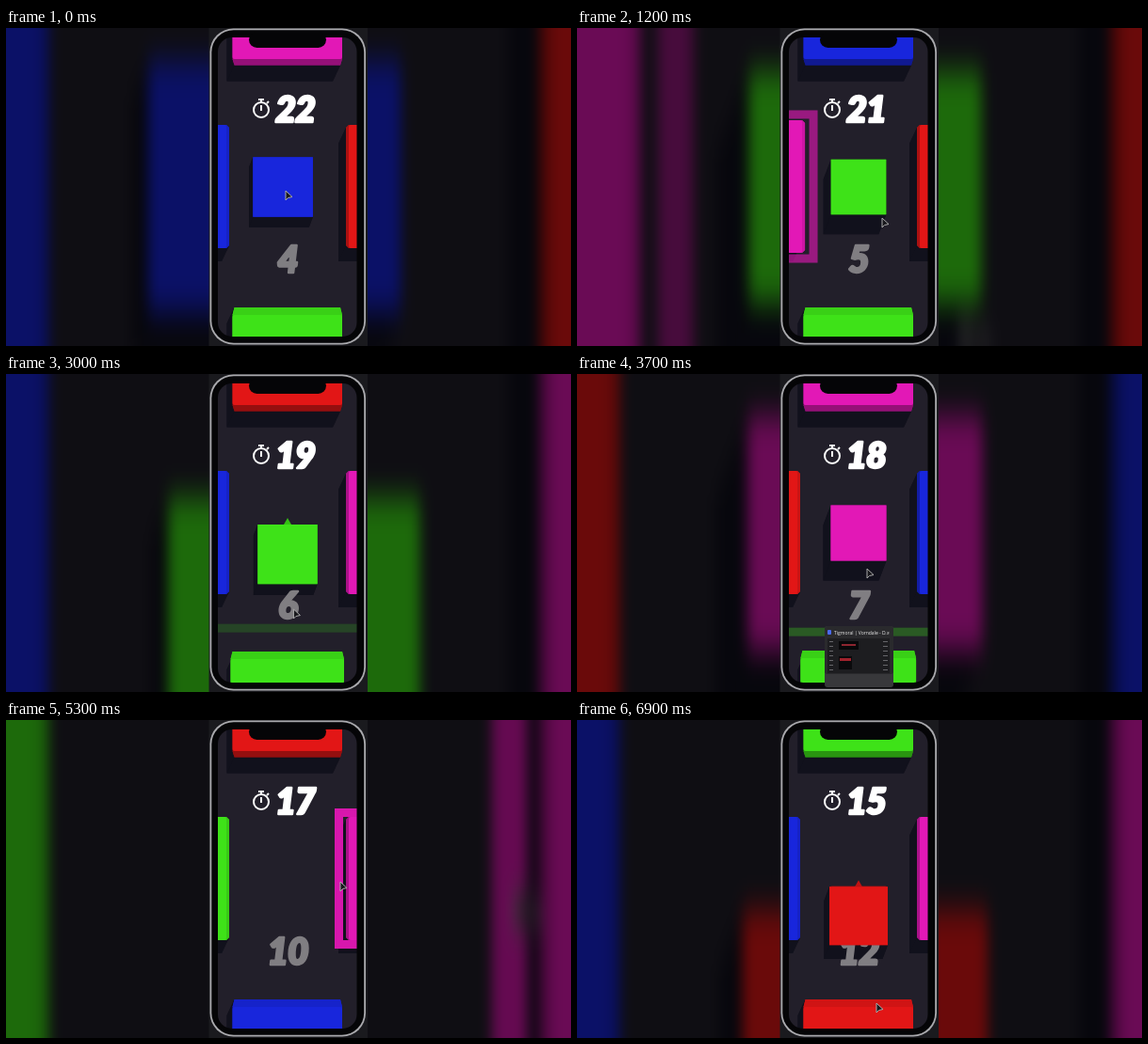
An HTML page with a canvas that plays this animation: 600 by 338 pixels, repeating every 7000 ms.

```html
<!DOCTYPE html>
<html lang="en">
<head>
<meta charset="utf-8">
<title>Swipe the cube</title>
<style>
  html, body { margin: 0; width: 100%; height: 100%; overflow: hidden; background: #0e0c12; }
  canvas { display: block; width: 600px; height: 338px; }
</style>
</head>
<body>
<canvas id="stage" width="600" height="338"></canvas>
<script>
const LOOP = 7000, STEP = 100, W = 600, H = 338;
const CX = 299, CY = 169;
const SHADOW = '#11111c';
const COLORS = { m: [226, 24, 182], b: [24, 38, 220], r: [226, 22, 22], g: [62, 226, 24] };

// Sides in order: top, left, right, bottom. Rectangles are [x0, y0, x1, y1].
const SIDES = [
  { dx: 0, dy: -1, travel: 130, shade: .66, front: [240.5, -15, 357, 33], base: [242.5, -15, 355, 39.5] },
  { dx: -1, dy: 0, travel: 70, shade: .9, front: [200, 103, 234, 234], base: [200, 106, 237, 231] },
  { dx: 1, dy: 0, travel: 70, shade: .75, front: [364, 103, 398, 234], base: [361, 106, 398, 231] },
  { dx: 0, dy: 1, travel: 130, shade: .92, front: [240.5, 305, 357, 353], base: [242.5, 297, 355, 353] }
];

// Each turn: swipe start, hit time, target side, wall colours.
const TURNS = [
  [-317, 880, 1, 'mbrg'], [1825, 2450, 3, 'bmrg'], [2850, 3210, 3, 'rbmg'],
  [3700, 4050, 0, 'mrbg'], [4700, 4950, 1, 'rgmb'], [5080, 5300, 2, 'rgmb'],
  [5430, 5650, 0, 'rgmb'], [5920, 6200, 3, 'rgmb'], [6650, 7105, 3, 'gbmr']
].map(([start, hit, side, walls]) => ({ start, hit, side, walls }));

// Pointer path: time, x, y
const POINTER = [
  [0, 297, 173], [600, 245, 178], [1200, 324, 202], [1800, 318, 210], [2400, 318, 400],
  [2850, 305, 190], [3200, 306, 330], [3700, 308, 207], [4050, 310, 120], [4700, 329, 170],
  [4950, 255, 172], [5300, 355, 172], [5950, 300, -15], [6200, 305, 345], [6600, 312, 190],
  [6900, 318, 301], [7000, 318, 320]
];

const makeContext = (width, height) =>
  Object.assign(document.createElement('canvas'), { width, height }).getContext('2d');
const stage = document.getElementById('stage').getContext('2d');
const scene = makeContext(W, H);
const backdrop = makeContext(W, 130);

const clamp = v => Math.max(0, Math.min(1, v));
const tint = (key, k = 1) => `rgb(${COLORS[key].map(v => Math.round(v * k))})`;
const grow = ([a, b, c, d], g) => [a - g, b - g, c + g, d + g];
const shift = ([a, b, c, d], x, y) => [a + x, b + y, c + x, d + y];
const corners = ([a, b, c, d]) => [[a, b], [c, b], [c, d], [a, d]];

function polygon(g, points, color) {
  g.fillStyle = color;
  g.beginPath();
  points.forEach(p => g.lineTo(...p));
  g.closePath();
  g.fill();
}

function rounded(g, [a, b, c, d], radius, color) {
  g.fillStyle = color;
  g.beginPath();
  g.roundRect(a, b, c - a, d - b, radius);
  g.fill();
}

// Fills the solid swept between two rectangles.
function extrude(from, to, color) {
  const p = corners(from), q = corners(to);
  polygon(scene, q, color);
  p.forEach((_, i) => {
    const j = (i + 1) % 4;
    polygon(scene, [p[i], p[j], q[j], q[i]], color);
  });
}

function drawWalls(t, turn, last) {
  const age = last ? (t - last.hit) / 650 : 1;
  SIDES.forEach(s => extrude(s.base, shift(s.base, -8, 17), SHADOW));
  SIDES.forEach((s, i) => {
    const key = turn.walls[i];
    const active = age < 1 && last.side === i;
    const swell = active ? 5.2 * Math.sin(Math.PI * age ** .8) : 0;
    if (active) {
      const width = 9;
      const [a, b, c, d] = grow(s.base, 12 + 27 * age * age - width / 2);
      scene.globalAlpha = clamp(1.3 - 1.3 * age);
      scene.strokeStyle = tint(key, .95);
      scene.lineWidth = width;
      scene.lineJoin = 'miter';
      scene.strokeRect(a, b, c - a, d - b);
      scene.globalAlpha = 1;
    }
    const front = grow(s.front, swell);
    extrude(front, grow(s.base, swell), tint(key, s.shade));
    rounded(scene, front, 2, tint(key));
  });
}

function heavyText(text, x, y, size, color) {
  scene.font = `italic 900 ${size}px Lato, sans-serif`;
  scene.letterSpacing = '-1px';
  scene.textAlign = 'center';
  scene.fillStyle = scene.strokeStyle = color;
  scene.lineWidth = 2.4;
  scene.lineJoin = 'round';
  scene.strokeText(text, x, y);
  scene.fillText(text, x, y);
}

function drawStopwatch() {
  scene.strokeStyle = scene.fillStyle = '#fff';
  scene.lineWidth = 2;
  scene.beginPath();
  scene.arc(271, 87, 8, 0, 7);
  scene.moveTo(271, 88);
  scene.lineTo(271, 82);
  scene.moveTo(277, 80);
  scene.lineTo(279, 78);
  scene.stroke();
  scene.fillRect(268, 75, 6, 2);
  scene.fillRect(270, 76, 2, 3);
}

function cubeAt(t, turn, last) {
  const side = SIDES[turn.side];
  const p = clamp((t - turn.start) / (turn.hit - turn.start));
  const q = p * p;
  const born = last ? clamp((t - last.hit) / 350) : 1;
  const scale = (1 - (1 - born) ** 2) * (1 + .08 * clamp(p / .2)) * (1 - q ** 3);
  const r = 29.5 * scale;
  const x = CX + side.dx * side.travel * q, y = CY + side.dy * side.travel * q;
  return { side, p, scale, r, x, y, key: turn.walls[turn.side], front: [x - r, y - r, x + r, y + r] };
}

function drawCubeShadow({ front, scale }) {
  const reach = 1 - 6 * Math.max(0, scale - 1);
  extrude(front, shift(front, -8 * reach, 21 * reach), SHADOW);
}

function drawCube({ side, p, r, x, y, key, front }) {
  const base = front.map((v, i) => {
    const c = i % 2 ? CY : CX;
    return c + (v - c) * .93;
  });
  if (p > .4 && p < .7) {
    const tip = (along, across) =>
      [x - side.dx * along + side.dy * across, y - side.dy * along + side.dx * across];
    polygon(scene, [tip(r + 7, 0), tip(r, 4), tip(r, -4)], tint(key, .85));
  }
  extrude(front, base, tint(key, .8));
  polygon(scene, corners(front), tint(key));
}

function drawPointer(t) {
  const i = POINTER.findIndex(k => k[0] > t);
  const [t0, x0, y0] = POINTER[i - 1], [t1, x1, y1] = POINTER[i];
  const k = (t - t0) / (t1 - t0);
  scene.save();
  scene.translate(x0 + (x1 - x0) * k, y0 + (y1 - y0) * k);
  polygon(scene, [[0, 0], [0, 10], [2.5, 7.5], [7, 6.5]], '#18181c');
  scene.strokeStyle = '#aaa';
  scene.lineWidth = 1;
  scene.stroke();
  scene.restore();
}

function drawScene(t) {
  const index = TURNS.findIndex(turn => t < turn.hit);
  const turn = TURNS[index], last = TURNS[index - 1];
  const cube = cubeAt(t, turn, last);
  scene.fillStyle = '#221f2a';
  scene.fillRect(0, 0, W, H);
  drawWalls(t, turn, last);
  drawCubeShadow(cube);
  drawStopwatch();
  heavyText(22 - Math.floor((t + 500) / 1000), 307, 99.5, 38, '#fff');
  heavyText(4 + index, 299, 260, 39, '#807e82');
  drawCube(cube);
  drawPointer(t);
}

// The zoomed scene is blurred in a flattened canvas, so it ends up softer vertically.
function drawBackdrop() {
  const zoom = 4.2, h = backdrop.canvas.height, zoomY = zoom * h / H;
  backdrop.setTransform(zoom, 0, 0, zoomY, W / 2 - zoom * 297.6, h / 2 - zoomY * CY);
  backdrop.filter = 'brightness(.47) blur(6.5px)';
  backdrop.drawImage(scene.canvas, 0, 0);
  stage.drawImage(backdrop.canvas, 0, 0, W, H);
}

function drawPhone() {
  stage.fillStyle = '#1a1a1e';
  stage.fillRect(215.5, 0, 168.5, H);
  rounded(stage, [216.5, .5, 382, 336.5], 25, '#aaaaae');
  rounded(stage, [218.3, 2.3, 380.2, 334.7], 23.5, '#050507');
  stage.save();
  stage.beginPath();
  stage.roundRect(225, 10, 147.5, 318, 15);
  stage.clip();
  stage.drawImage(scene.canvas, 0, 0);
  stage.restore();
  rounded(stage, [258, 4, 340, 21], 9, '#050507');
}

function drawTaskPreview() {
  rounded(stage, [263, 268, 336, 333], 3, '#38383b');
  rounded(stage, [263, 268, 336, 319], 3, '#2a2a2d');
  rounded(stage, [266, 272, 270, 277], 1, '#4b6bf0');
  stage.fillStyle = '#eee';
  stage.font = '5px "Open Sans", sans-serif';
  stage.fillText('Tigmoral | Vorndale - D...', 273, 276.5);
  stage.fillText('×', 329, 276.5);
  rounded(stage, [266, 281, 332, 318], 0, '#1d1d20');
  rounded(stage, [278, 284, 299, 293], 0, '#08080a');
  rounded(stage, [281, 287, 296, 289], 0, '#8c2530');
  rounded(stage, [278, 300, 292, 314], 0, '#0a0a0c');
  rounded(stage, [279, 302, 291, 305], 0, '#a0222c');
  stage.fillStyle = '#66666a';
  for (let y = 284; y < 316; y += 5) {
    stage.fillRect(268, y, 4, 1);
    stage.fillRect(325, y, 5, 1);
  }
}

function frame() {
  const t = Math.floor(performance.now() % LOOP / STEP) * STEP;
  drawScene(t);
  drawBackdrop();
  drawPhone();
  if (t >= 3400 && t < 4000) drawTaskPreview();
  requestAnimationFrame(frame);
}
frame();
</script>
</body>
</html>
```
